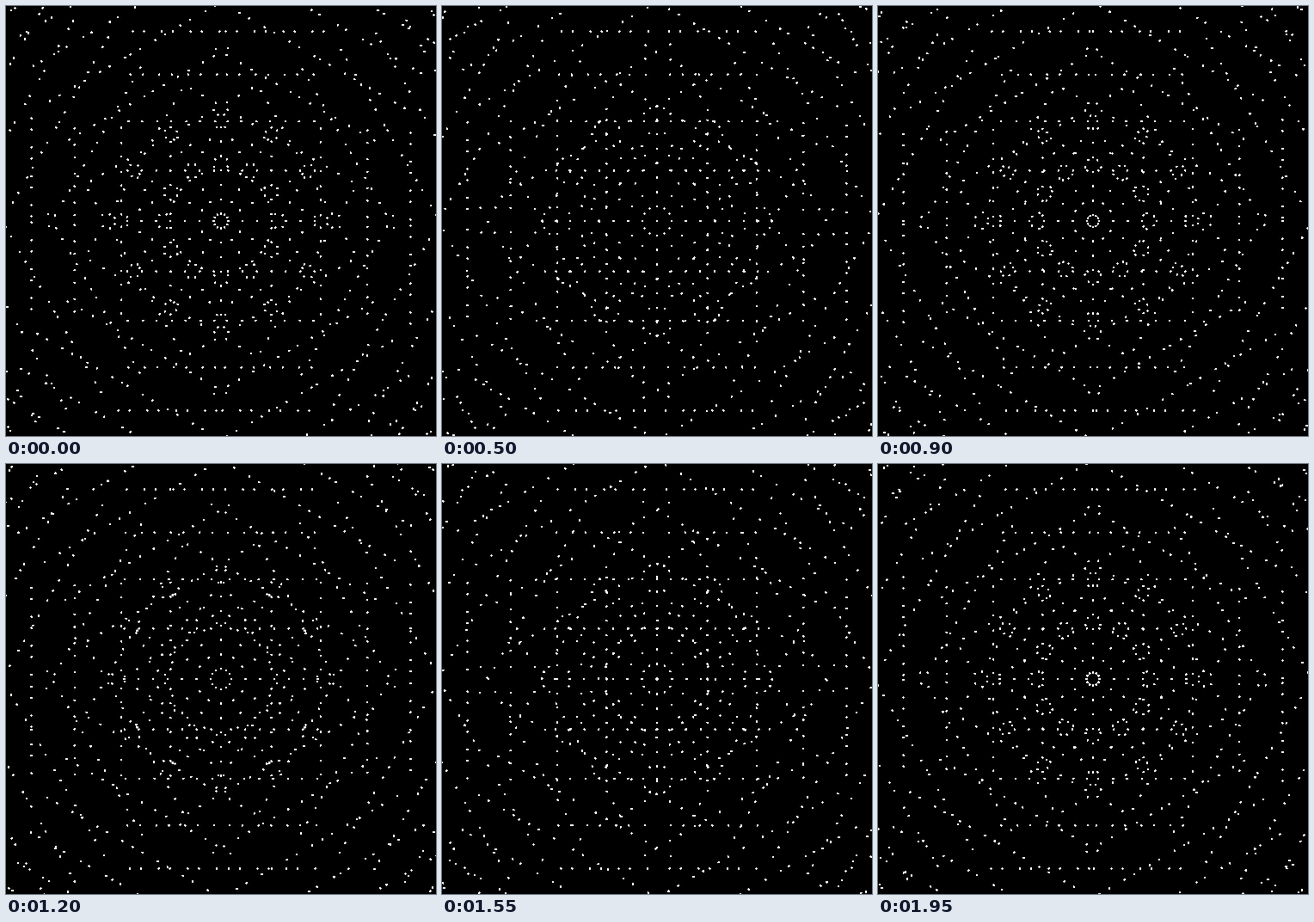
An HTML page with a canvas that plays this animation: 500x500 px, repeating every 2000 ms.

```html
<!DOCTYPE html>
<html lang="en">
<head>
<meta charset="utf-8">
<title>Drifting dots</title>
<style>
html, body { margin: 0; width: 100%; height: 100%; overflow: hidden; background: #000; }
canvas { display: block; }
</style>
</head>
<body>
<canvas id="stage" width="500" height="500"></canvas>
<script>
const ctx = document.getElementById('stage').getContext('2d');
const SIZE = 500, MID = SIZE / 2;
const LOOP = 2000, STEP = 50;
const SPOKES = 12, ROWS = 7;
const SPEED = 16.8, GAP = SPEED * LOOP / 1000, REACH = 120;
const DOT_R = 1.3;
const rad = deg => deg * Math.PI / 180;
const mod = (a, n) => ((a % n) + n) % n;
const rowDistance = k => 375 * Math.sin(rad(9 * k));
// Rows further from the centre run a little late, more so on the far side.
const lag = k => k * k * (0.3 - 0.12 * Math.sign(k));

// Hard-edged dot: fills each pixel whose centre lies inside the disc.
function dot(x, y) {
  const px = Math.floor(x), py = Math.floor(y);
  for (let j = py - 1; j <= py + 1; j++) {
    for (let i = px - 1; i <= px + 1; i++) {
      if (Math.hypot(i + 0.5 - x, j + 0.5 - y) <= DOT_R) ctx.fillRect(i, j, 1, 1);
    }
  }
}

// Dots leave the middle of a row, alternately to one side and the other.
function row(angle, k, sec) {
  const c = Math.cos(angle), s = Math.sin(angle), d = rowDistance(k);
  for (const side of [1, -1]) {
    const wait = side > 0 ? 0.5 : 1.5;
    const first = mod((sec + wait) * SPEED - lag(k), GAP);
    for (let p = first; p <= REACH; p += GAP) {
      dot(MID + d * c - side * p * s, MID + d * s + side * p * c);
    }
  }
}

function draw(ms) {
  ctx.fillStyle = '#000';
  ctx.fillRect(0, 0, SIZE, SIZE);
  ctx.fillStyle = '#fff';
  for (let j = 0; j < SPOKES; j++) {
    for (let k = -ROWS; k <= ROWS; k++) row(rad(j * 360 / SPOKES), k, ms / 1000);
  }
}

const start = performance.now();
function tick() {
  const t = (performance.now() - start) % LOOP;
  draw(Math.floor(t / STEP) * STEP);
  requestAnimationFrame(tick);
}
tick();
</script>
</body>
</html>
```
